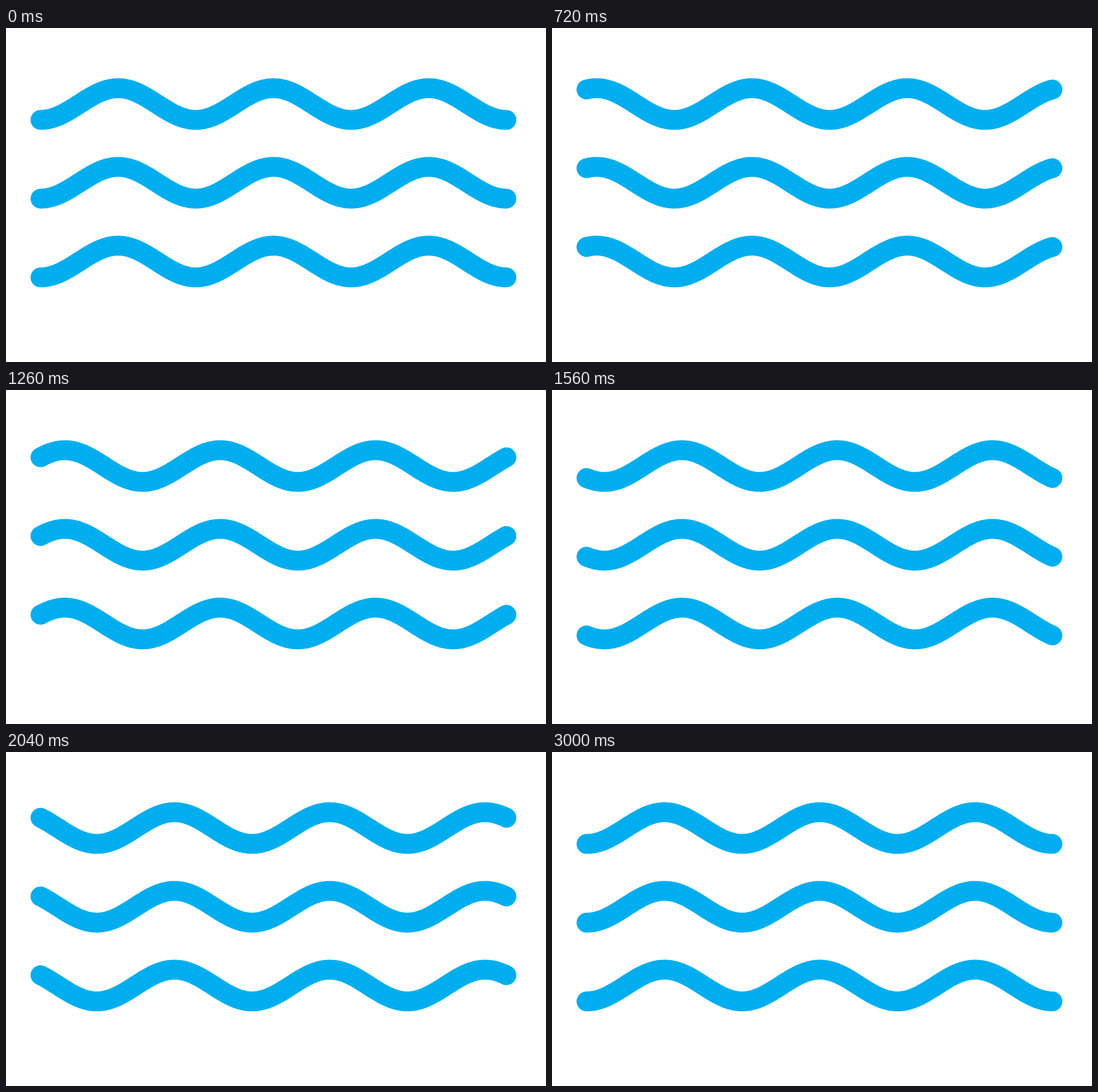
These frames come from a looping animation (950x589 px, 3030 ms). An HTML page:

```html
<!DOCTYPE html>
<html lang="en">
<head>
<meta charset="utf-8">
<title>Waves</title>
<style>
  html, body { margin: 0; width: 100%; height: 100%; overflow: hidden; background: #fff; }
  svg { display: block; width: 950px; height: 589px; }
  path { fill: none; stroke: #00aeef; stroke-width: 35; stroke-linecap: round; stroke-linejoin: round; }
</style>
</head>
<body>
<svg viewBox="0 0 950 589">
  <defs><path id="wave"/></defs>
  <use href="#wave" y="134.1"/>
  <use href="#wave" y="272.9"/>
  <use href="#wave" y="411.8"/>
</svg>
<script>
  const STEP = 30, STEPS = 101;
  const LEFT = 60.7, PERIOD = 273.2, CYCLES = 3, AMP = 28;
  const CREST = LEFT + PERIOD / 2;

  // Speed profile in steps: slow drift, plus a ramp up, a cruise and a ramp down.
  const START = 3.2, RAMP = 29.6, CRUISE = 23.7, DRIFT = 0.62;
  const ACCEL = (CYCLES * PERIOD - DRIFT * STEPS) / (RAMP * (RAMP + CRUISE));

  const wave = document.getElementById('wave');
  const begin = performance.now();
  let shown = -1;

  const ramp = x => x > 0 ? x * x / 2 : 0;

  function travel(n) {
    const u = n - START;
    return DRIFT * n + ACCEL * (ramp(u) - ramp(u - RAMP)
      - ramp(u - RAMP - CRUISE) + ramp(u - 2 * RAMP - CRUISE));
  }

  function wavePath(shift) {
    const count = 240, points = [];
    for (let i = 0; i <= count; i++) {
      const x = LEFT + CYCLES * PERIOD * i / count;
      const y = -AMP * Math.cos(2 * Math.PI * (x - CREST + shift) / PERIOD);
      points.push(x.toFixed(2) + ' ' + y.toFixed(2));
    }
    return 'M' + points.join('L');
  }

  function draw() {
    const n = Math.floor((performance.now() - begin) / STEP) % STEPS;
    if (n !== shown) {
      wave.setAttribute('d', wavePath(travel(n)));
      shown = n;
    }
    requestAnimationFrame(draw);
  }
  draw();
</script>
</body>
</html>
```
